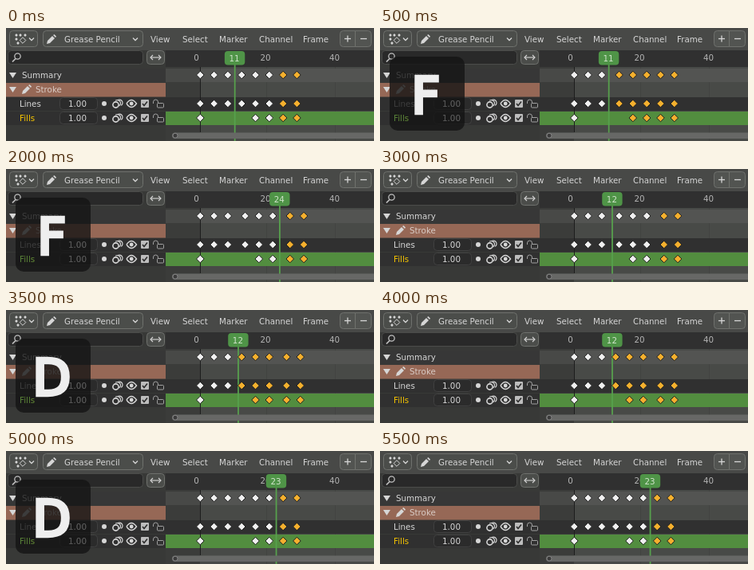
Animation of 461x142 px, one loop 6000 ms. Source, as an HTML page with a canvas:

```html
<!DOCTYPE html>
<html lang="en">
<head>
<meta charset="utf-8">
<title>Dope sheet</title>
<style>
html, body { margin: 0; width: 100%; height: 100%; overflow: hidden; background: #383838; }
canvas { display: block; width: 461px; height: 142px; }
</style>
</head>
<body>
<canvas id="stage"></canvas>
<script>
const W = 461, H = 142, LOOP = 6000, STEP = 500;
const canvas = document.getElementById('stage');
const ctx = canvas.getContext('2d');
const dpr = window.devicePixelRatio || 1;
canvas.width = W * dpr;
canvas.height = H * dpr;
ctx.scale(dpr, dpr);

const FONT = '"DejaVu Sans", Verdana, sans-serif';
const LIGHT = '#d6d6d6', WHITE = '#f0f0f0', ORANGE = '#f5b02e', GREEN = '#4f9447';
const BUTTON = '#4b4d4a', RIM = '#6f716d';
const ROWS = [59, 95, 113];
const frameX = f => 239 + f * 4.325;

// Key layouts: the first `white` keys are unselected
const START = { keys: [1, 5, 9, 13, 17, 21, 25, 29], white: 6 };
const PUSHED = { keys: [1, 5, 9, 14, 18, 22, 26, 30], white: 3 };
const LONGEST = { keys: [1, 5, 9, 14, 18, 22, 27, 31], white: 6 };
const PULLED = { keys: [1, 5, 9, 13, 17, 21, 26, 30], white: 3 };

const SCENES = [
  [START, 11, ''],
  [PUSHED, 11, 'F'], [PUSHED, 11, ''], [PUSHED, 24, ''],
  [LONGEST, 24, 'F'], [LONGEST, 24, ''], [LONGEST, 12, ''],
  [PULLED, 12, 'D'], [PULLED, 12, ''], [PULLED, 23, ''],
  [START, 23, 'D'], [START, 23, '']
];

function rect(x, y, w, h, fill) {
  ctx.fillStyle = fill;
  ctx.fillRect(x, y, w, h);
}

function box(x, y, w, h, r, fill, stroke) {
  ctx.beginPath();
  ctx.roundRect(x, y, w, h, r);
  ctx.fillStyle = fill;
  ctx.fill();
  if (stroke) outline(stroke, 1);
}

function outline(color, width) {
  ctx.strokeStyle = color;
  ctx.lineWidth = width;
  ctx.stroke();
}

function trace(points, closed) {
  ctx.beginPath();
  points.forEach(([x, y]) => ctx.lineTo(x, y));
  if (closed) ctx.closePath();
}

function line(points, color, width = 1.3) {
  trace(points);
  outline(color, width);
}

function shape(points, fill) {
  trace(points, true);
  ctx.fillStyle = fill;
  ctx.fill();
}

function circle(x, y, r, fill) {
  ctx.beginPath();
  ctx.arc(x, y, r, 0, Math.PI * 2);
  if (fill) {
    ctx.fillStyle = fill;
    ctx.fill();
  }
}

function label(str, x, y, color = LIGHT, align = 'left', size = 10.3) {
  ctx.font = `${size}px ${FONT}`;
  ctx.textAlign = align;
  ctx.fillStyle = color;
  ctx.fillText(str, x, y);
}

function diamond(x, y, r, fill, edge) {
  shape([[x, y - r], [x + r, y], [x, y + r], [x - r, y]], fill);
  if (edge) outline(edge, 1);
}

function chevron(x, y) {
  line([[x - 3, y - 1.5], [x, y + 1.5], [x + 3, y - 1.5]], LIGHT);
}

function pencil(x, y, color) {
  shape([[x, y + 12], [x + 1, y + 8], [x + 7, y + 2], [x + 10, y + 5], [x + 4, y + 11]], color);
  shape([[x + 8, y + 1], [x + 9.5, y], [x + 12, y + 2.5], [x + 11, y + 4]], color);
}

function triangle(y) {
  shape([[4, y], [13, y], [8.5, y + 7]], LIGHT);
}

function sheetIcon() {
  [[13, 9], [18, 9], [13, 14], [15, 19], [24, 9]]
    .forEach(([x, y]) => diamond(x, y, 1.9, LIGHT));
  diamond(21, 15.5, 3.8, BUTTON, LIGHT);
}

function header() {
  rect(0, 0, W, 28, '#484947');
  box(4.5, 3.5, 35, 20, 4, BUTTON, RIM);
  sheetIcon();
  chevron(32, 14);
  box(46.5, 3.5, 125, 20, 4, BUTTON, RIM);
  pencil(51, 8, LIGHT);
  label('Grease Pencil', 73, 18);
  chevron(162, 14);
  [['View', 181], ['Select', 221], ['Marker', 267], ['Channel', 317], ['Frame', 372]]
    .forEach(([name, x]) => label(name, x, 18));
  box(418.5, 3.5, 19, 20, [4, 0, 0, 4], '#525451', RIM);
  box(437.5, 3.5, 20, 20, [0, 4, 4, 0], '#525451', RIM);
  line([[424, 13.5], [432, 13.5]], LIGHT);
  line([[428, 9.5], [428, 17.5]], LIGHT);
  line([[444, 13.5], [452, 13.5]], LIGHT);
}

function channelIcons(y) {
  circle(123, y, 3, LIGHT);
  circle(137.5, y + 1.5, 3.6);
  outline(LIGHT, 1.6);
  for (const [x, top] of [[139.5, -0.5], [142, -1]]) {
    ctx.beginPath();
    ctx.arc(x, y + top, 4, -2.2, 1);
    outline(LIGHT, 1.2);
  }
  ctx.beginPath();
  ctx.moveTo(151, y);
  ctx.quadraticCurveTo(157, y - 9, 163.5, y);
  ctx.quadraticCurveTo(157, y + 9, 151, y);
  outline(LIGHT, 1.4);
  circle(157.2, y, 2.4, LIGHT);
  box(169, y - 5, 10, 10, 1, '#bdbdbd');
  line([[171, y], [173, y + 2.5], [177, y - 2.5]], '#2d2d2d', 1.6);
  ctx.beginPath();
  ctx.roundRect(189.5, y - 0.5, 8, 5.5, 1);
  outline('#a0a0a0', 1);
  ctx.beginPath();
  ctx.moveTo(184.5, y);
  ctx.lineTo(184.5, y - 2);
  ctx.arc(187.5, y - 2, 3, Math.PI, 0);
  ctx.lineTo(190.5, y);
  outline('#a0a0a0', 1);
}

function channels() {
  rect(0, 28, 200, 114, '#383937');
  box(2.5, 28.5, 169, 17, 4, '#292929', '#4b4c4a');
  circle(14.5, 35.5, 3.7);
  outline('#c0c0c0', 1.3);
  line([[12, 38.5], [8, 42.5]], '#c0c0c0', 1.7);
  box(176.5, 28.5, 22, 17, 4, BUTTON, RIM);
  line([[181, 37], [194, 37]], LIGHT, 1.1);
  line([[184, 34], [181, 37], [184, 40]], LIGHT, 1.1);
  line([[191, 34], [194, 37], [191, 40]], LIGHT, 1.1);

  rect(0, 51, 200, 17, '#373737');
  triangle(56);
  label('Summary', 20, 63);
  rect(0, 69, 200, 17.5, '#966856');
  triangle(74);
  pencil(20, 71, LIGHT);
  label('Stroke', 37, 81, '#d9cbc5');

  [['Lines', 95, LIGHT], ['Fills', 113, '#f5c400']].forEach(([name, y, color]) => {
    rect(0, y - 8, 200, 17, '#303030');
    label(name, 17, y + 4, color);
    box(67.5, y - 7.5, 47, 15, 4, '#2b2b2b', '#414141');
    label('1.00', 78, y + 4);
    channelIcons(y);
  });
}

function timeline() {
  rect(200, 28, 261, 114, '#484a47');
  rect(200, 28, 43, 114, '#3b3c3a');
  rect(200, 28, 261, 21, '#303030');
  [20, 40].forEach(f => rect(Math.round(frameX(f)), 49, 1, 93, '#424341'));
  rect(200, 51, 261, 17, '#535452');
  rect(200, 51, 43, 17, '#484947');
  rect(200, 87, 261, 17, '#303030');
  rect(200, 105, 261, 17, '#528d3f');
  rect(243, 49, 1, 82, '#1d1d1d');
  [0, 20, 40].forEach(f => label(f, frameX(f) - 0.5, 41, '#b4b4b4', 'center'));
}

function scrollbar() {
  box(208, 131.5, 260, 7.5, 3.7, '#676866');
  circle(212, 135.2, 3, '#3b3b3b');
  outline('#858585', 1);
}

function playhead(f) {
  const x = frameX(f);
  rect(x - 0.8, 45, 1.8, 97, '#57a04d');
  box(x - 12.7, 29, 25.4, 17.5, 4, GREEN);
  label(f, x - 0.5, 41.5, '#cfe3ca', 'center');
}

function drawKeys({ keys, white }) {
  ROWS.forEach((y, row) => keys.forEach((f, i) => {
    if (row === 2 && i > 0 && i < 4) return;
    diamond(frameX(f), y, 4.8, i < white ? WHITE : ORANGE, '#202020');
  }));
}

function keycap(letter) {
  box(12, 36, 94, 93, 10, 'rgba(20,20,20,.79)');
  label('Fills', 17, 117, '#56803a');
  ROWS.slice(1).forEach(y => label('1.00', 78, y + 4, '#595959'));
  label(letter, 57.3, 106.7, '#eee', 'center', 62);
  ctx.strokeStyle = '#eee';
  ctx.lineWidth = 4.5;
  ctx.strokeText(letter, 57.3, 106.7);
}

function draw(now) {
  const [layout, current, letter] = SCENES[Math.floor((now % LOOP) / STEP)];
  header();
  channels();
  timeline();
  playhead(current);
  scrollbar();
  drawKeys(layout);
  if (letter) keycap(letter);
}

function tick() {
  draw(performance.now());
  requestAnimationFrame(tick);
}
tick();
</script>
</body>
</html>
```
